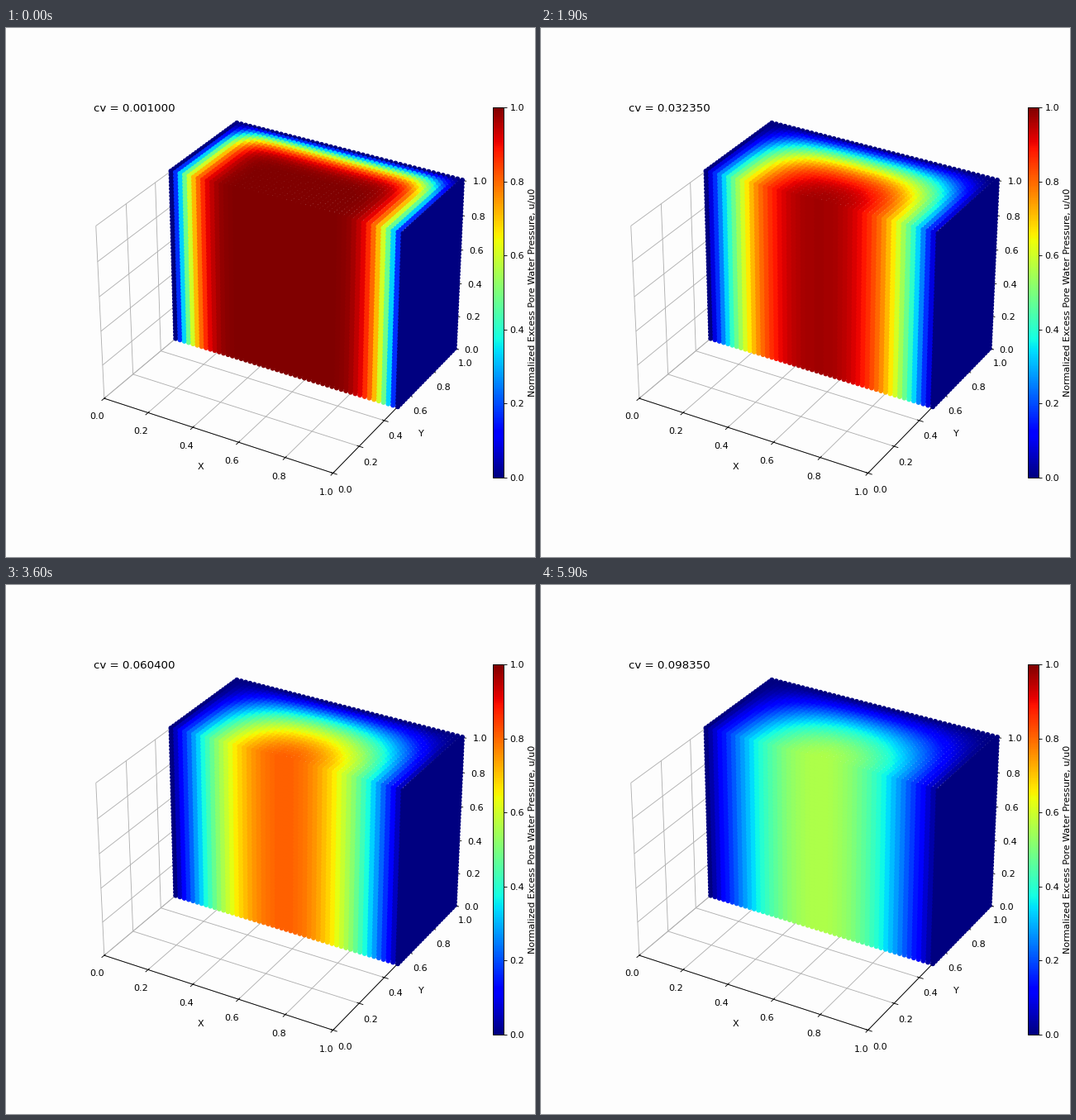
These frames come from a looping animation (640x640 px, 6000 ms). A matplotlib script:

```python
import numpy as np
import matplotlib.pyplot as plt
from matplotlib.animation import FuncAnimation

FRAMES, INTERVAL = 60, 100
CV_MIN, CV_MAX = 0.001, 0.1
N = 50
PAPER = "#fdfdfd"

plt.rcParams["font.family"] = "DejaVu Sans"


def visible_points():
    """Grid points on the faces of the half cube that the viewer can see."""
    axis = np.linspace(0, 1, N)
    half = axis[axis >= 0.5]
    x, y, z = (a.ravel() for a in np.meshgrid(axis, half, axis, indexing="ij"))
    # the cut face is two layers deep so that no gaps show between markers
    keep = (x == 1) | (y <= half[1]) | (z == 1)
    return x[keep], y[keep], z[keep]


def dissipation(s, d):
    """1D consolidation series for drained ends after diffusion d."""
    n = np.arange(1, 42, 2)[:, None]
    terms = np.sin(n * np.pi * s) * np.exp(-(n * np.pi) ** 2 * d) / n
    return 4 / np.pi * terms.sum(axis=0)


def pressure(cv):
    # linear in cv, with a smooth floor at small values
    d = (0.0046 ** 4 + (0.54 * cv) ** 4) ** 0.25
    return np.clip(dissipation(X, d) * dissipation(Y, d), 0, 1)


def cv_at(i):
    return CV_MIN + (CV_MAX - CV_MIN) * i / FRAMES


X, Y, Z = visible_points()

fig = plt.figure(figsize=(8, 8), dpi=80, facecolor=PAPER)
ax = fig.add_subplot(111, projection="3d", facecolor=PAPER)
ax.set(xlim=(0, 1), ylim=(0, 1), zlim=(0, 1), xlabel="X", ylabel="Y")
for axis in (ax.xaxis, ax.yaxis, ax.zaxis):
    axis.set_pane_color((1, 1, 1, 0))

cloud = ax.scatter(X, Y, Z, c=pressure(CV_MIN), s=20, vmin=0, vmax=1,
                   cmap="jet", depthshade=False)
label = ax.text2D(0.05, 0.95, "", transform=ax.transAxes, fontsize=12)

bar = fig.colorbar(cloud, cax=fig.add_axes([0.92, 0.15, 0.02, 0.7]))
bar.set_ticks(np.linspace(0, 1, 6))
bar.set_label("Normalized Excess Pore Water Pressure, u/u0")


def update(i):
    cv = cv_at(i)
    cloud.set_array(pressure(cv))
    label.set_text(f"cv = {cv:.6f}")
    return cloud, label


anim = FuncAnimation(fig, update, frames=FRAMES, interval=INTERVAL,
                     init_func=lambda: update(0), repeat=True, repeat_delay=0)
plt.show()
```
